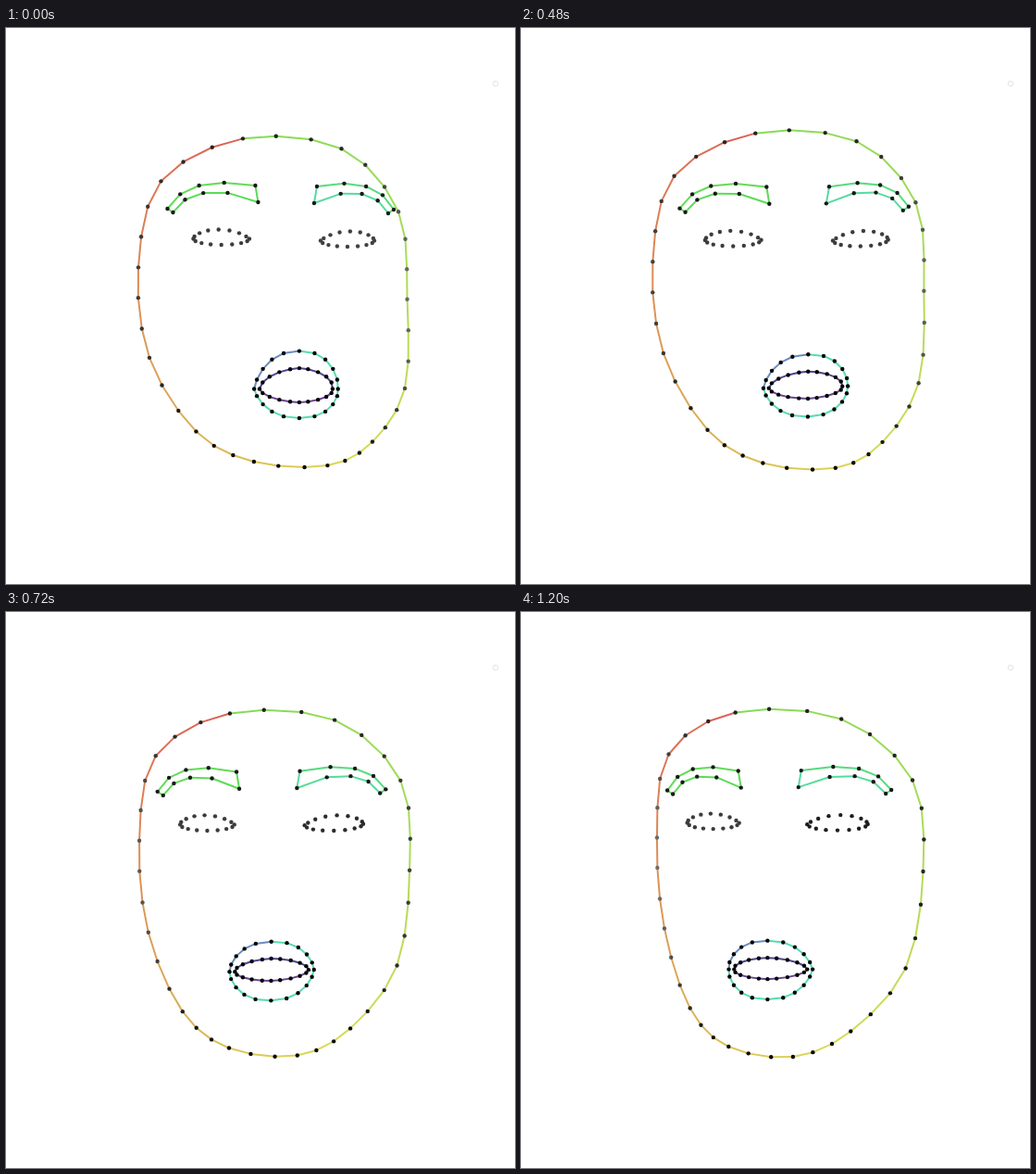
An HTML page with a canvas that plays this animation: 550x600 px, repeating every 1.28 s.

```html
<!DOCTYPE html>
<html lang="en">
<head>
<meta charset="utf-8">
<title>Face mesh</title>
<style>
html, body { margin: 0; width: 100%; height: 100%; overflow: hidden; background: #fff; }
canvas { display: block; width: 550px; height: 600px; }
</style>
</head>
<body>
<canvas id="stage" width="550" height="600"></canvas>
<script>
const ctx = document.getElementById('stage').getContext('2d');
const STEP = 80, STEPS = 16;
const { PI, abs, sin, cos, sign, sqrt, max } = Math;

const mix = (a, b, s) => a + (b - a) * s;
const rise = (n, mid) => 1 / (1 + Math.exp(-.75 * (n - mid)));
const bump = (n, mid, width) => Math.exp(-(((n - mid) / width) ** 2));
const range = (count, fn) => Array.from({ length: count }, (_, i) => fn(i));

// Outline key points: x, y facing one way, then x, y after the turn
const outline = [
  [256, 119, 231.5, 108], [362.5, 130, 346, 115], [424, 198, 423, 181],
  [433.5, 292.5, 434.5, 279.5], [431, 388.5, 415.5, 384], [396, 446, 356, 452],
  [347.5, 471.5, 293.5, 479.5], [268, 467.5, 224, 468.5], [205.5, 435, 182.5, 427],
  [155, 355.5, 155, 341], [143, 258, 147, 243], [167.5, 165, 159.5, 153]
];

function spline(a, b, c, d, t) {
  return b + t / 2 * (c - a + t * (2 * a - 5 * b + 4 * c - d + t * (3 * (b - c) + d - a)));
}

// Closed curve through the keys, three dots per span
function contour(m) {
  const keys = outline.map(([x0, y0, x1, y1]) => [mix(x0, x1, m.turn), mix(y0, y1, m.lift)]);
  const key = i => keys[(i + keys.length) % keys.length];
  return range(keys.length * 3, i => {
    const k = Math.floor(i / 3), t = i % 3 / 3;
    return [0, 1].map(axis => spline(...[-1, 0, 1, 2].map(j => key(k + j)[axis]), t));
  });
}

// Upper arch from the inner end outwards, lower arch back again
function brow(x, y, width, side, droop) {
  return range(10, i => {
    const low = i > 4, t = (low ? 9 - i : i) / 4;
    const dx = width * t * (1.56 - .56 * t) - (low ? 3 + 3 * t : 0);
    const dy = t * (50 * t - 25 - droop) + (low ? 18 - 14 * sqrt(t) : 0);
    return [x + side * dx, y + dy];
  });
}

function eye(x, y, width, side) {
  return range(16, i => {
    const a = i * PI / 8, s = sin(a);
    const along = (1 - cos(a)) / 2 + max(0, s) * .05;
    return [x + side * width * along, y - (s > 0 ? 10 * s ** 1.4 : 6.5 * s)];
  });
}

// Ring of dots from the left corner over the top; skew pushes the middle sideways
function lips({ x, y, half, up, down, skew, wide, tall }) {
  return range(20, i => {
    const a = i * PI / 10, c = cos(a), s = sin(a), h = abs(s) ** tall;
    return [
      x - half * sign(c) * abs(c) ** wide + skew * abs(s),
      y + (s > 0 ? -up : down) * h
    ];
  });
}

// Tilt of the head halfway through the turn
function warp([x, y], m) {
  const u = (x - 290) / 145, v = (y - 295) / 185;
  const inner = max(0, 1 - u * u - v * v);
  return {
    u, v,
    x: x + m.tilt * (.3 + 1.8 * u - 1.2 * v - 1.2 * u * v),
    y: y - m.tilt * 3 * u * (1 + .9 * v) + m.dip * 1.8 * inner + .5
  };
}

function drawRing(ring, m, grey, stroke) {
  const pts = ring.map(p => warp(p, m));
  if (stroke) {
    pts.forEach((p, i) => {
      const q = pts[(i + 1) % pts.length];
      ctx.strokeStyle = stroke(i);
      ctx.beginPath();
      ctx.moveTo(p.x, p.y);
      ctx.lineTo(q.x, q.y);
      ctx.stroke();
    });
  }
  for (const p of pts) {
    const g = Math.round(grey(p.u, p.v));
    ctx.fillStyle = `rgb(${g}, ${g}, ${g})`;
    ctx.beginPath();
    ctx.arc(p.x, p.y, 2.2, 0, PI * 2);
    ctx.fill();
  }
}

const hsl = (h, s = 65, l = 60) => `hsl(${h}, ${s}%, ${l}%)`;

function draw(n) {
  const m = { turn: rise(n, 8.5), lift: rise(n, 5.8), tilt: bump(n, 7.7, 3.5), dip: bump(n, 8.8, 4) };
  const across = (a, b) => mix(a, b, m.turn);
  const along = (a, b) => mix(a, b, m.lift);

  ctx.fillStyle = '#fff';
  ctx.fillRect(0, 0, 550, 600);
  ctx.lineWidth = 1;
  ctx.strokeStyle = '#e4e4e4';
  ctx.beginPath();
  ctx.roundRect(526.5, 57.5, 5, 5, 1);
  ctx.stroke();
  ctx.lineWidth = 2;
  ctx.lineCap = 'round';

  // Dots fade on the side that turns away
  const shade = (u, v) => 20 - 15 * v +
    max(0, 1 - v * v) * abs(u) * (u > 0 ? across(85, 15) : across(38, 90));
  drawRing(contour(m), m, shade, i => hsl(98 - 2.1 * i - .015 * i * i));

  const droop = along(0, 4);
  drawRing(brow(across(269.5, 234.5), along(169.5, 171), across(95, 76.5), -1, droop),
    m, () => 25, i => hsl(114 + i / 2));
  drawRing(brow(across(336, 302.5), 170.5, across(83, 97.5), 1, droop),
    m, () => 25, i => hsl(i < 5 ? 138 : 152));

  drawRing(eye(across(263, 235.5), 227, across(60.5, 56), -1), m, () => 60);
  drawRing(eye(across(340, 309), along(229, 228.5), across(58, 65.5), 1), m, () => across(65, 30));

  const mouth = { x: across(313.5, 269.5), y: along(389, 385), skew: across(3.5, -3.5) };
  drawRing(lips({ ...mouth, half: 45.3, up: along(41, 31), down: along(31.5, 32.5), wide: .85, tall: 1.2 }),
    m, () => 5, i => i < 5 ? hsl(215, 40, 58) : hsl(162));
  drawRing(lips({ ...mouth, half: 39.5, up: along(22.5, 12.5), down: along(14.5, 10.5), wide: 1.2, tall: 1 }),
    m, () => 5, i => hsl(i < 10 ? 245 : 268, 35, 42));
}

const start = performance.now();
function tick() {
  draw(Math.floor((performance.now() - start) / STEP) % STEPS);
  requestAnimationFrame(tick);
}
tick();
</script>
</body>
</html>
```
